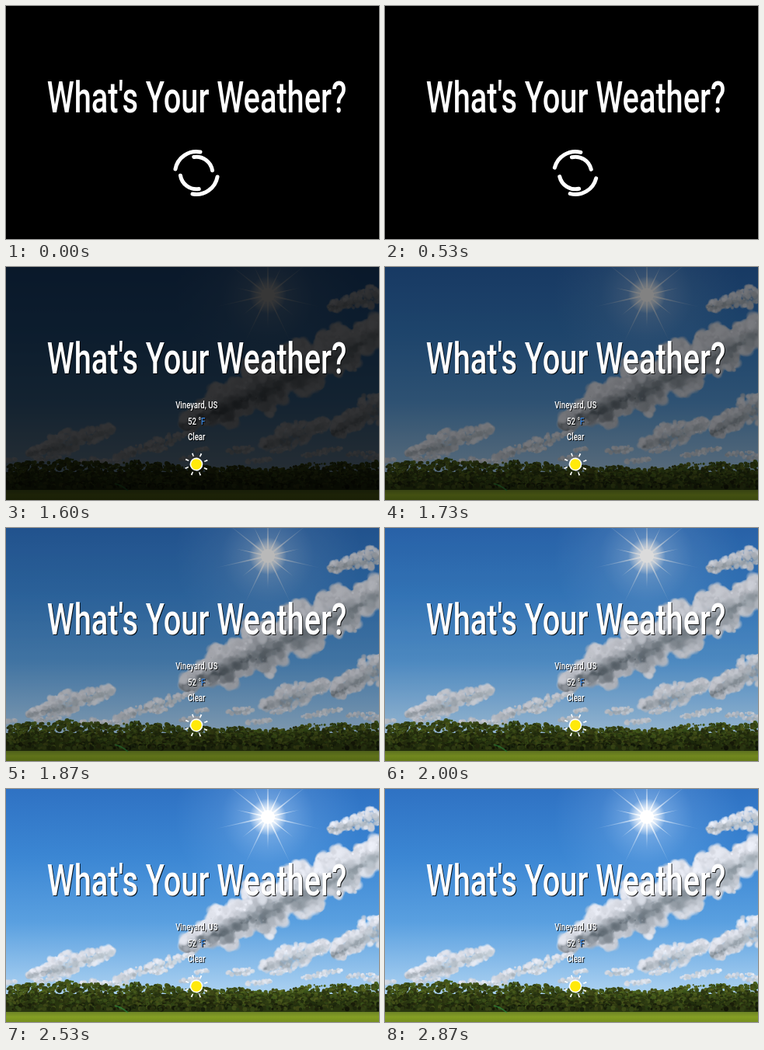
Write an HTML page with a canvas that moves like this. It is 480 by 300 pixels and loops after 2940 ms.

```html
<!DOCTYPE html>
<html lang="en">
<head>
<meta charset="utf-8">
<title>Weather</title>
<style>
  html, body { margin: 0; width: 100%; height: 100%; overflow: hidden; background: #000; }
  canvas, svg { position: absolute; left: 0; top: 0; width: 480px; height: 300px; }
  text { font: 500 13.3px Roboto, "Liberation Sans", sans-serif; fill: #fff; text-anchor: middle; }
  .title { font-size: 55px; }
  .unit { fill: #3a87e0; }
  .big { filter: drop-shadow(1.5px 1.5px .6px #000d); }
  .small { filter: drop-shadow(1px 1px .5px #000d); }
  #spinner { fill: none; stroke: #fff; stroke-width: 5; stroke-linecap: round; }
</style>
</head>
<body>
<canvas id="sky" width="480" height="300"></canvas>
<svg viewBox="0 0 480 300">
  <g class="big"><g transform="translate(245.5 0) scale(.722 1)">
    <text class="title" y="137">What's Your Weather?</text>
  </g></g>
  <g id="spinner">
    <circle id="outer" r="27.5" pathLength="4" stroke-dasharray="1 1"/>
    <circle id="inner" r="20.8" pathLength="4" stroke-dasharray="1 1"/>
  </g>
  <g id="info">
    <g class="small"><g transform="translate(245.2 0) scale(.722 1)">
      <text y="182">Vineyard, US</text>
      <text y="203">52 °<tspan class="unit">F</tspan></text>
      <text y="223.5">Clear</text>
    </g></g>
    <g transform="translate(245 254) rotate(-20)">
      <circle r="13" fill="none" stroke="#fff" stroke-width="4.4" pathLength="80" stroke-dasharray="1.6 8.4" stroke-dashoffset=".8"/>
      <circle r="7.6" fill="#ffe90a" stroke="#fff" stroke-width="1.6"/>
    </g>
  </g>
</svg>
<script>
const LOOP = 2940, FRAME = LOOP / 44, REVEAL = 1440, FADE = 1000;
const $ = id => document.getElementById(id);
const g = $('sky').getContext('2d');

let seed = 7;
const rand = (lo = 0, hi = 1) =>
  lo + (hi - lo) * (seed = (seed * 16807) % 2147483647) / 2147483647;

function gradient(grad, stops) {
  stops.forEach((c, i) => grad.addColorStop(i / (stops.length - 1), c));
  return grad;
}
const linear = (y0, y1, ...stops) => gradient(g.createLinearGradient(0, y0, 0, y1), stops);
const radial = (x, y, r, ...stops) => gradient(g.createRadialGradient(x, y, 0, x, y, r), stops);

function disc(x, y, r, fill) {
  g.fillStyle = fill;
  g.beginPath();
  g.arc(x, y, r, 0, 7);
  g.fill();
}

// A bank of puffs along a line: bright rim, shaded core that is darkest at the start
function cloud(x0, y0, x1, y1, thick) {
  const len = Math.hypot(x1 - x0, y1 - y0), phase = rand(0, 6);
  for (let n = 15 + len * thick * .25; n > 0; n--) {
    const t = rand(), v = rand(-1, 1);
    const bumps = .8 + .2 * Math.sin(t * len / 9 + phase) + .15 * Math.sin(t * len / 4);
    const half = thick * bumps * Math.sqrt(Math.sin(Math.PI * t));
    const x = x0 + (x1 - x0) * t + v * half * (y0 - y1) / len;
    const y = y0 + (y1 - y0) * t + v * half * (x1 - x0) / len;
    const core = Math.max(0, 1 - Math.abs(v - .3) * 1.3);
    const tone = 242 - core * (25 + thick * 3.2) * (1 - t * .65) - rand(0, 35);
    const rgb = `${tone - core * 8},${tone + 3},${tone + 12}`;
    const r = rand(1.5, 3 + thick * .15);
    disc(x, y, r, radial(x, y, r, `rgba(${rgb},.85)`, `rgba(${rgb},.7)`, `rgba(${rgb},0)`));
  }
}

function drawClouds() {
  for (let i = 0; i < 16; i++) {
    const x = i * 31 + rand(-10, 10), y = rand(236, 252), w = rand(18, 40);
    cloud(x, y, x + w, y - 3, rand(2, 5));
  }
  cloud(228, 202, 505, 70, 36);
  cloud(415, 52, 500, 30, 13);
  cloud(28, 240, 138, 208, 15);
  cloud(138, 246, 240, 212, 8);
  cloud(328, 230, 415, 200, 17);
  cloud(420, 212, 500, 165, 20);
}

function drawSun(x, y) {
  disc(x, y, 120, radial(x, y, 120, 'rgba(200,225,255,.6)', 'rgba(165,205,250,.15)', 'rgba(150,200,255,0)'));
  g.fillStyle = radial(x, y, 75, '#fff', 'rgba(255,255,255,.35)', 'rgba(255,255,255,0)');
  for (let i = 0; i < 14; i++) {
    g.save();
    g.translate(x, y);
    g.rotate(i * Math.PI / 7 + Math.PI / 14);
    g.translate(-x, -y);
    g.beginPath();
    g.moveTo(x, y - 1.3);
    g.lineTo(x + (i % 2 ? 42 : 72), y);
    g.lineTo(x, y + 1.3);
    g.fill();
    g.restore();
  }
  disc(x, y, 24, radial(x, y, 24, '#fff', 'rgba(255,255,255,.7)', 'rgba(255,255,255,0)'));
  disc(x, y, 9, '#fff');
}

function drawTrees() {
  const top = x => 248 + 9 * Math.exp(-(((x - 310) / 105) ** 2))
    + 1.6 * Math.sin(x / 7) + 1.6 * Math.sin(x / 17);
  g.fillStyle = '#28350f';
  g.fillRect(0, 264, 480, 25);
  for (let i = 0; i < 2400; i++) {
    const x = rand(0, 480), depth = i / 2400, y0 = top(x);
    const r = rand(1, 3.2), y = y0 + r + depth * (284 - y0 - r);
    disc(x, y, r, `hsl(${rand(70, 86)},52%,${rand(15, 29) - depth * 10}%)`);
  }
}

function drawScene() {
  g.fillStyle = linear(0, 258, '#2f72c3', '#3b86d3', '#5aa0e0', '#a8cff0');
  g.fillRect(0, 0, 480, 300);
  drawSun(337, 36);
  drawClouds();
  drawTrees();
  g.fillStyle = linear(287, 300, '#6d8426', '#849e24', '#768f1e');
  g.fillRect(0, 287, 480, 13);
  g.strokeStyle = 'rgba(40,150,70,.6)';
  g.lineWidth = 1.5;
  g.beginPath();
  g.moveTo(140, 279);
  g.quadraticCurveTo(149, 281, 157, 288);
  g.stroke();
}

// CSS "ease" curve, solved by bisection
function ease(p) {
  const bez = (a, b, s) => 3 * a * s * (1 - s) ** 2 + 3 * b * s * s * (1 - s) + s ** 3;
  let lo = 0, hi = 1;
  for (let i = 0; i < 20; i++) {
    const mid = (lo + hi) / 2;
    if (bez(.25, .25, mid) < p) lo = mid; else hi = mid;
  }
  return bez(.1, 1, lo);
}

function render(now) {
  // The picture advances in steps of one frame
  const t = Math.floor(((now % LOOP) + 7) / FRAME) % 44 * FRAME;
  const loaded = t >= REVEAL, turn = t / 1070 * 368;
  $('spinner').style.display = loaded ? 'none' : '';
  $('info').style.display = loaded ? '' : 'none';
  $('outer').setAttribute('transform', `translate(245 215) rotate(${10.5 + turn})`);
  $('inner').setAttribute('transform', `translate(245 215) rotate(${81 - turn})`);
  $('sky').style.opacity = loaded ? ease(Math.min(1, (t - REVEAL) / FADE)) : 0;
}

drawScene();
const start = performance.now();
function tick() {
  render(performance.now() - start);
  requestAnimationFrame(tick);
}
tick();
</script>
</body>
</html>
```
